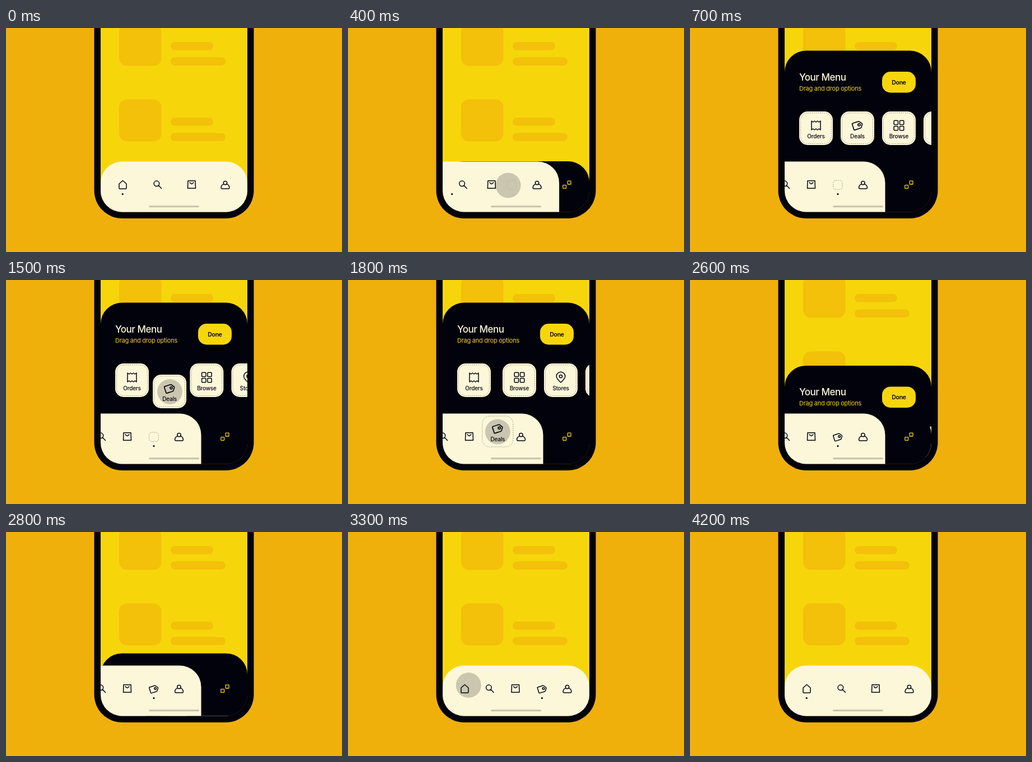
An HTML page for the animation above (4.8 s loop, 600 px wide and 400 px high).

```html
<!DOCTYPE html>
<html lang="en">
<head>
<meta charset="utf-8">
<title>Menu drag and drop</title>
<style>
  html, body { margin: 0; width: 100%; height: 100%; overflow: hidden; background: #efb00b; }
  svg { display: block; width: 100vw; height: 100vh; font-family: Inter, sans-serif; }
  .ink { fill: #02020c; }
  .cream { fill: #fdf7da; }
  .yellow { fill: #f6d60b; }
  .block { fill: #f3c00a; }
  .line { fill: none; stroke: #02020c; stroke-width: 1.5; stroke-linejoin: round; stroke-linecap: round; }
  .dashed { fill: none; stroke: #8f8b7a; stroke-width: .8; stroke-dasharray: 2 1.6; }
  .label { font-size: 10px; font-weight: 500; letter-spacing: -.2px; text-anchor: middle; }
</style>
</head>
<body>
<svg viewBox="0 0 600 400">
  <defs>
    <clipPath id="screen"><rect x="169" y="-80" width="262" height="408.5" rx="38"/></clipPath>

    <path id="home" class="line" d="M-6.5-1.8L0-7.5 6.5-1.8V6Q6.5 7.3 5.2 7.3H-5.2Q-6.5 7.3-6.5 6Z"/>
    <path id="search" class="line" d="M3.2-1.7a4.8 4.8 0 1 1-9.6 0a4.8 4.8 0 1 1 9.6 0M2 1.8L7 7"/>
    <path id="bag" class="line" d="M-6.5-6.8H6.5L7 6.8H-7ZM-3.3-3.6Q0 1.4 3.3-3.6"/>
    <path id="person" class="line" d="M3.2-3.4a3.2 3.2 0 1 1-6.4 0a3.2 3.2 0 1 1 6.4 0M-2.6-1.4C-6 0-7.4 3-7.4 5Q-7.4 7-5.4 7H5.4Q7.4 7 7.4 5C7.4 3 6 0 2.6-1.4"/>
    <path id="tag" class="line" transform="rotate(-18)" d="M-6.2-5.5H3.4Q4.2-5.5 4.7-4.8L7.6-.7Q8 0 7.6.7L4.7 4.8Q4.2 5.5 3.4 5.5H-6.2Q-7.2 5.5-7.2 4.5V-4.5Q-7.2-5.5-6.2-5.5ZM4.6-.2a1.8 1.8 0 1 1-3.6 0a1.8 1.8 0 1 1 3.6 0"/>
    <path id="receipt" class="line" d="M-8-8l2.7 2 2.6-2 2.7 2 2.7-2 2.6 2L8-8V8l-2.7-2-2.6 2L0 6-2.7 8-5.3 6-8 8Z"/>
    <g id="tiles" class="line">
      <rect x="-8.8" y="-8.8" width="7.3" height="7.3" rx="1"/><rect x="1.5" y="-8.8" width="7.3" height="7.3" rx="1"/>
      <rect x="-8.8" y="1.5" width="7.3" height="7.3" rx="1"/><rect x="1.5" y="1.5" width="7.3" height="7.3" rx="1"/>
    </g>
    <path id="pin" class="line" d="M0 9C-5 4.5-7.8 1.5-7.8-2a7.8 7.8 0 0 1 15.6 0C7.8 1.5 5 4.5 0 9ZM2.6-2a2.6 2.6 0 1 1-5.2 0a2.6 2.6 0 1 1 5.2 0"/>
    <g id="card">
      <rect class="cream" width="60" height="60" rx="15"/>
      <rect class="dashed" x="2.5" y="2.5" width="55" height="55" rx="13"/>
    </g>
    <g id="row" class="block">
      <rect x="202" y="127.5" width="75.5" height="75" rx="14"/>
      <rect x="294" y="160" width="76" height="14.5" rx="7.25"/>
      <rect x="294" y="187.5" width="98" height="14.5" rx="7.25"/>
    </g>
  </defs>

  <rect width="600" height="400" fill="#efb00b"/>
  <rect class="ink" x="157.5" y="-100" width="285" height="440" rx="50"/>

  <g clip-path="url(#screen)">
    <rect class="yellow" x="169" y="-10" width="262" height="350"/>
    <use href="#row"/>
    <use href="#row" y="-135"/>

    <g id="panel">
      <rect class="ink" x="169" y="40.5" width="262" height="340" rx="38"/>
      <text class="cream" x="195" y="94" font-size="17" font-weight="500" letter-spacing="-.5">Your Menu</text>
      <text class="yellow" x="195" y="112" font-size="11" letter-spacing="-.25">Drag and drop options</text>
      <rect class="yellow" x="343" y="78" width="60" height="37.5" rx="15"/>
      <text class="ink" x="373" y="100.7" font-size="10.5" font-weight="600" letter-spacing="-.3" text-anchor="middle">Done</text>
      <g transform="translate(195 149)">
        <use href="#card"/><use href="#receipt" x="30" y="25"/><text class="label ink" x="30" y="47.5">Orders</text>
      </g>
      <g id="queue">
        <g transform="translate(343 149)">
          <use href="#card"/><use href="#tiles" x="30" y="25"/><text class="label ink" x="30" y="47.5">Browse</text>
        </g>
        <g transform="translate(417 149)">
          <use href="#card"/><use href="#pin" x="30" y="25"/><text class="label ink" x="30" y="47.5">Stores</text>
        </g>
        <use href="#card" x="491" y="149"/>
      </g>
    </g>

    <g id="tray">
      <path class="ink" d="M169 340V276a38 38 0 0 1 38-38H393a38 38 0 0 1 38 38V340Z"/>
      <g class="line" style="stroke:#f6d60b;stroke-width:1.3">
        <rect x="383.8" y="280.6" width="5.8" height="5.8" rx=".6"/>
        <rect x="392.2" y="273.2" width="5.8" height="5.8" rx=".6"/>
      </g>
    </g>

    <g id="bar">
      <path class="cream" d="M169 340V276.5a38 38 0 0 1 38-38H393a38 38 0 0 1 38 38V340Z"/>
      <use href="#home" x="208.5" y="280"/>
      <use href="#person" x="391.5" y="280"/>
      <use id="barSearch" href="#search" y="279.5"/>
      <use id="barBag" href="#bag" y="279.5"/>
      <g id="restIcons"><use href="#search" x="270.5" y="279.5"/><use href="#bag" x="331.5" y="279.5"/></g>
      <rect id="slot" class="dashed" x="338.2" y="272" width="16.4" height="16.4" rx="4.5"/>
      <g id="barTag"><use href="#tag"/></g>
      <circle id="dot" class="ink" cy="296.6" r="1.6"/>
    </g>
    <rect x="255" y="317.3" width="90" height="3" rx="1.5" fill="#000" opacity=".22"/>

    <g id="deal">
      <use href="#card"/>
      <g transform="translate(30 25) scale(1.14)"><use href="#tag"/></g>
      <text class="label ink" x="30" y="47.5">Deals</text>
    </g>
    <circle id="touch" r="22.5"/>
  </g>
</svg>

<script>
const LOOP = 4800;
const el = id => document.getElementById(id);
const ramp = (t, a, b) => Math.min(1, Math.max(0, (t - a) / (b - a)));
const ease = (t, a, b) => {
  const p = ramp(t, a, b);
  return p < .5 ? 2 * p * p : 1 - 2 * (1 - p) ** 2;
};
const mix = (a, b, p) => a + (b - a) * p;
const move = (id, x, y, scale = 1) => el(id).setAttribute('transform', `translate(${x} ${y}) scale(${scale})`);
const fade = (id, opacity) => el(id).setAttribute('opacity', opacity);

// Panel offset from its open position, as [time, y]
const panelTrack = [[600, 198], [700, 0], [2300, 0], [2400, 27], [2500, 68], [2600, 112],
  [2700, 150], [2800, 176], [2900, 192], [3000, 198]];

const touches = [
  { show: [50, 150], move: [150, 580], hide: [600, 690], from: [340, 281], to: [257.5, 281] },
  { show: [1130, 1250], move: [1300, 1940], hide: [1950, 2080], from: [299.5, 179.5], to: [264, 280.5] },
  { show: [2120, 2250], move: [2120, 2250], hide: [2310, 2400], from: [374, 97], to: [374, 97] },
  { show: [3040, 3140], move: [3050, 3420], hide: [3450, 3590], from: [243, 245], to: [208, 281] }
];

function track(t, keys) {
  const next = keys.findIndex(k => k[0] > t);
  if (next === 0) return keys[0][1];
  if (next < 0) return keys[keys.length - 1][1];
  const [a, b] = [keys[next - 1], keys[next]];
  return mix(a[1], b[1], ramp(t, a[0], b[0]));
}

function drawTouch(t) {
  const touch = touches.find(c => t >= c.show[0] && t < c.hide[1]);
  if (!touch) return fade('touch', 0);
  const p = ease(t, ...touch.move);
  move('touch', mix(touch.from[0], touch.to[0], p), mix(touch.from[1], touch.to[1], p));
  fade('touch', .2 * (ramp(t, ...touch.show) - ramp(t, ...touch.hide)));
}

function draw(t) {
  const slide = ease(t, 150, 580) - ease(t, 2880, 3250);
  const spread = ease(t, 150, 580);
  const drag = ease(t, 1300, 1940);
  const drop = ramp(t, 1940, 2100);
  const reset = ramp(t, 3900, 4200);
  const panelY = track(t, panelTrack);

  fade('panel', slide > 0 ? 1 : 0);
  fade('tray', slide > 0 ? 1 : 0);
  move('panel', 0, panelY);
  move('queue', -74 * drag, 0);

  move('deal', 269 - 35 * drag, 149 + 101 * drag + panelY);
  fade('deal', 1 - drop);

  move('bar', -82.5 * slide, 0);
  move('barSearch', mix(270.5, 253, spread), 0);
  move('barBag', mix(331.5, 299, spread), 0);
  fade('barSearch', 1 - reset);
  fade('barBag', 1 - reset);
  fade('restIcons', reset);
  fade('slot', t < 1940 ? ramp(t, 350, 600) : 0);
  move('barTag', 346.5, mix(275, 280.5, drop), mix(1.14, 1, drop));
  fade('barTag', t < 1940 ? 0 : 1 - reset);
  el('dot').setAttribute('cx', 208.2 + 138.3 * (ease(t, 300, 600) - ease(t, 3400, 3590)));

  drawTouch(t);
}

const start = performance.now();
function frame() {
  draw((performance.now() - start) % LOOP);
  requestAnimationFrame(frame);
}
frame();
</script>
</body>
</html>
```
